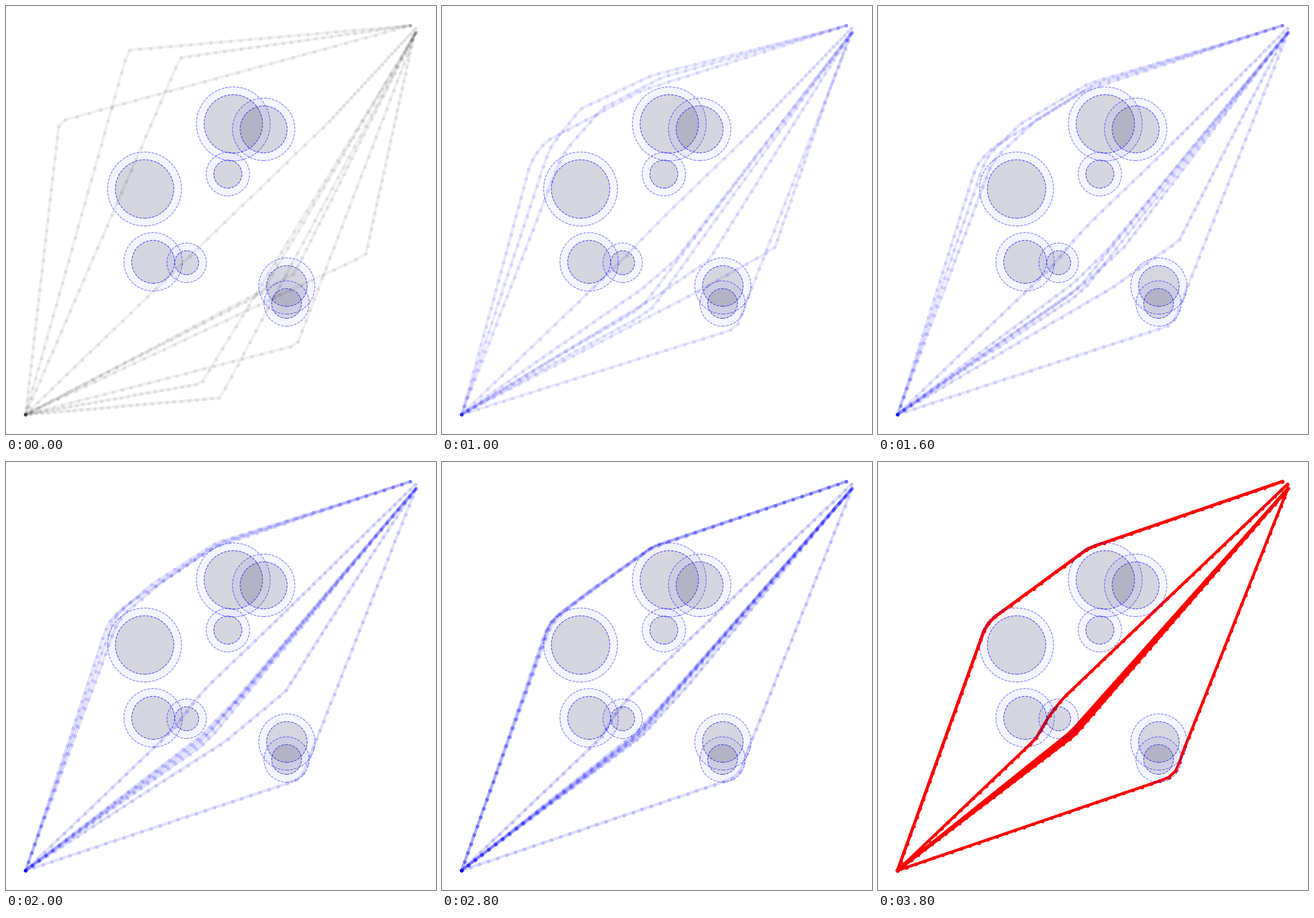
A matplotlib script for the animation above (7800 ms loop, 751 by 746 pixels).

```python
import numpy as np
import matplotlib.pyplot as plt
from matplotlib.animation import FuncAnimation
from matplotlib.patches import Circle

W, H, DPI = 751, 746, 100
STEPS, TICKS = 19, 39     # optimisation steps, then the result is held
N = 64                    # waypoints per trajectory
U = np.linspace(0, 1, N)
MARGIN, CLEAR = 13.5, 11  # drawn safety ring, distance kept by taut paths

START = np.array([34, 712.0])
TOP, MID, LOW = (706, 34), (715, 39), (716, 46)

OBSTACLES = [  # x, y, radius
    (397, 205.5, 51), (450, 215, 41), (387.5, 293, 24.5), (242, 319, 51),
    (257, 446, 37.5), (315.5, 447.5, 21), (490.5, 488, 35.5), (490, 518.5, 26),
]
UPPER, LEFT, SMALL, RIGHT, BOTTOM = (OBSTACLES[i] for i in (0, 3, 5, 6, 7))


def along(points):
    """Waypoints spread evenly over a polyline."""
    p = np.array(points, float)
    s = np.r_[0, np.cumsum(np.hypot(*np.diff(p, axis=0).T))]
    return np.column_stack([np.interp(U * s[-1], s, c) for c in p.T])


def bent(knee, goal):
    """Two straight legs, each slowing down at its outer end."""
    a, b = np.array(knee) - START, np.array(goal) - knee
    la, lb = np.hypot(*a), np.hypot(*b)
    k = 0.35 + 0.3 * la / (la + lb)
    first = np.clip(U / k, 0, 1) ** 1.1
    second = 1 - np.clip((1 - U) / (1 - k), 0, 1) ** 1.1
    return START + np.outer(first, a) + np.outer(second, b)


def taut(goal, circles, side, clear=CLEAR):
    """String pulled tight past circles; side 1 passes below, -1 above."""
    centers = np.array([START, *[c[:2] for c in circles], goal])
    radii = side * np.array([0, *[c[2] + clear for c in circles], 0])
    dx, dy = np.diff(centers, axis=0).T
    heading = np.arctan2(dy, dx) + np.arcsin(np.diff(radii) / np.hypot(dx, dy))
    points = [START]
    for c, r, h0, h1 in zip(centers[1:-1], radii[1:-1], heading, heading[1:]):
        for h in np.linspace(h0, h1, 8):
            points.append(c + r * np.array([-np.sin(h), np.cos(h)]))
    return along([*points, goal])


def decay(n):
    """Free paths: fast at first, then settling."""
    return (1 - np.exp(-0.21 * n)) / (1 - np.exp(-0.21 * STEPS))


def held(steps):
    """Paths caught on an obstacle: slow release, then catching up."""
    def ease(n):
        x = min(n / steps, 1)
        return x * x * (3 - 2 * x)
    return ease


# first shape, last shape, easing
over = taut(TOP, [LEFT, UPPER], -1)
paths = [(bent(knee, TOP), over, decay)
         for knee in ((213, 77), (304, 90), (93, 201))]

weave = along([START, (275, 483), (298, 444), (322, 413), MID])
paths.append((bent((562, 204), MID), weave, held(16)))
paths.append((bent((508, 591), LOW),
              taut(LOW, [BOTTOM, RIGHT], 1, CLEAR - 1), decay))

CENTRAL = [((445, 502), decay), ((341, 658), decay), ((374, 683), decay),
           ((503, 467), held(12)), ((628, 434), held(16))]
for j, (knee, ease) in enumerate(CENTRAL):
    goal = (LOW[0] - 0.9 * j, LOW[1] + 1.2 * j)
    last = taut(goal, [SMALL], 1, CLEAR - 1 + 2.2 * j)
    paths.append((bent(knee, goal), last, ease))

fig = plt.figure(figsize=(W / DPI, H / DPI), dpi=DPI, facecolor="white")
ax = fig.add_axes([0, 0, 1, 1])
ax.set_xlim(0, W)
ax.set_ylim(0, H)
ax.axis("off")

lines = [ax.plot([], [], "-o", lw=3.6, ms=3.6, mew=1, zorder=1)[0]
         for _ in paths]

for x, y, r in OBSTACLES:
    for radius, face, edge in ((r, (0, 0, 0, 0.125), 0.65),
                               (r + MARGIN, (0, 0, 1, 0.04), 0.5)):
        ax.add_patch(Circle((x, H - y), radius, fc=face, ec=(0, 0, 1, edge),
                            lw=0.9, ls="--", zorder=3))


def draw(tick):
    n = min(tick, STEPS)
    color = "black" if n == 0 else "red" if n == STEPS else "blue"
    alpha = 1 if n == STEPS else 0.055 + 0.005 * n
    for line, (first, last, ease) in zip(lines, paths):
        x, y = (first + ease(n) * (last - first)).T
        line.set_data(x, H - y)
        line.set_color(color)
        line.set_alpha(alpha)
    return lines


anim = FuncAnimation(fig, draw, frames=TICKS, interval=200, repeat=True,
                     repeat_delay=0, blit=False)
plt.show()
```
